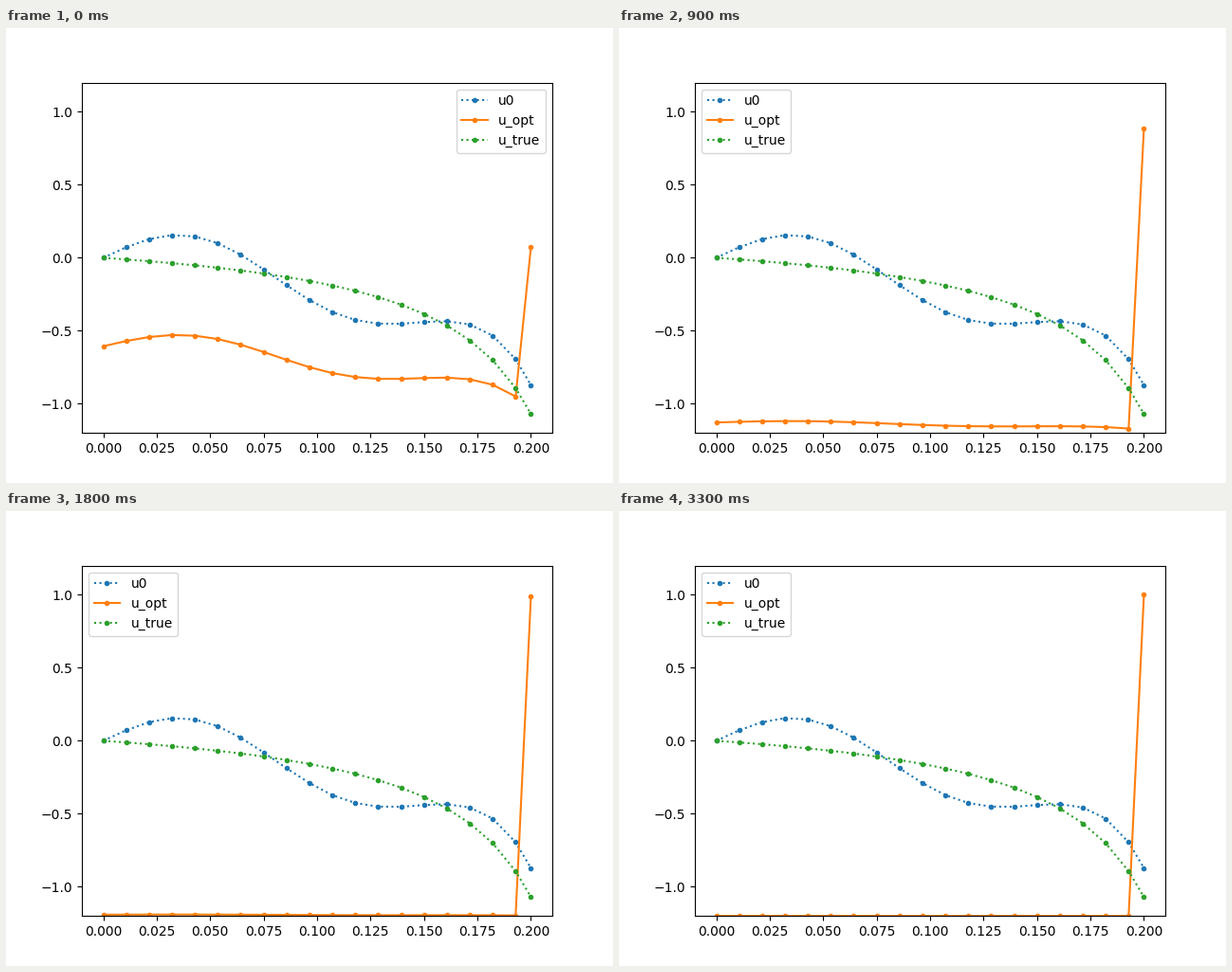
A matplotlib script that plays this animation: 640x480 px, repeating every 3.6 s.

```python
import numpy as np
import matplotlib.pyplot as plt
from matplotlib.animation import FuncAnimation

FRAMES = 12
INTERVAL = 300
DECAY = 0.495  # share of the remaining gap left after each step

t = np.append(np.arange(19) * 0.15 / 14, 0.2)
u_true = -t / (1 - 4.0655 * t)
u0 = u_true + 0.2 * np.sin(40 * t)
goal = np.where(t < 0.2, -1.2, 1.0)


def u_opt(step):
    return goal + (u0 - goal) * DECAY ** (step + 1)


fig, ax = plt.subplots(figsize=(6.4, 4.8), dpi=100)
ax.plot(t, u0, ".:", label="u0")
opt_line, = ax.plot(t, u_opt(0), ".-", label="u_opt")
ax.plot(t, u_true, ".:", label="u_true")
ax.set_xlim(-0.01, 0.21)
ax.set_ylim(-1.2, 1.2)
ax.legend(loc="best")


def update(step):
    opt_line.set_ydata(u_opt(step))
    return (opt_line,)


anim = FuncAnimation(fig, update, frames=FRAMES, interval=INTERVAL,
                     init_func=lambda: update(0), repeat=True,
                     repeat_delay=0, blit=False)
plt.show()
```
